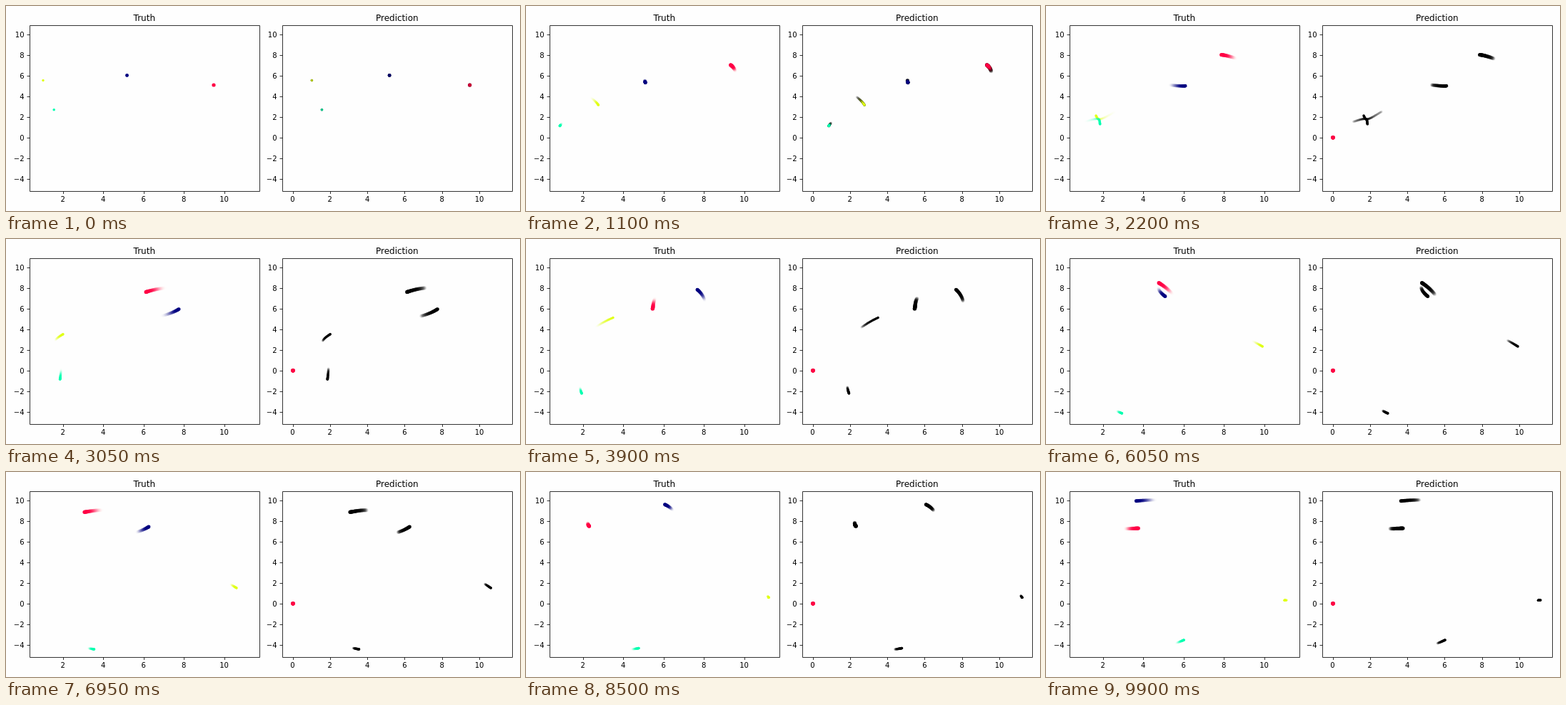
These frames come from a looping animation (720x288 px, 9.95 s). An HTML page with a canvas:

```html
<!DOCTYPE html>
<html lang="en">
<head>
<meta charset="utf-8">
<title>Truth and prediction</title>
<style>
  html, body { margin: 0; width: 720px; height: 288px; overflow: hidden; background: #fefefe; }
  svg, canvas { position: absolute; left: 0; top: 0; display: block; }
  text { font: 10px "DejaVu Sans", sans-serif; fill: #000; }
  .title { font-size: 12px; }
  path { fill: none; stroke: #000; stroke-width: 0.8; }
</style>
</head>
<body>
<canvas id="dots" width="720" height="288"></canvas>
<svg id="axes" width="720" height="288"></svg>
<script>
const STEP = 50, STEPS = 199;
const TRAIL = 10, DENSITY = 3; // trail length in steps, dots per step
const COLLAPSE = 25; // step from which every prediction sits at the origin
const ORIGIN = [402, 184.8];

// Turning points of each path: [step, x, y] in pixels of the left plot.
const yellow = { color: '#e0ff17', r: 1.7, keys: [
  [0, 52, 104.5], [31, 101, 146.5], [35, 97, 148.5], [41, 74, 159], [44, 70, 154], [69, 97, 124],
  [78, 122, 110.5], [87, 178, 89], [93, 226, 111.5], [102, 260.5, 128.5], [139, 323, 163],
  [170, 340, 176.5], [198, 334, 180.2]] };

const green = { color: '#00ffb0', r: 1.8, keys: [
  [0, 67.2, 145.8], [22, 47.5, 168.5], [35, 54.5, 162.5], [41, 74, 159.3], [44, 75.7, 166],
  [69, 75.5, 208], [78, 78, 217], [102, 91.5, 236], [139, 123.5, 249], [170, 158, 247.5],
  [198, 193.2, 236]] };

const navy = { color: '#000080', r: 2.45, keys: [
  [0, 169.5, 97.5], [20, 167, 107], [35, 173, 111], [44, 195, 112.3], [69, 250.4, 87],
  [78, 240, 71.2], [93, 197, 56.8], [102, 166, 58.2], [130, 182.5, 84.7], [139, 200, 77],
  [152, 210, 63.5], [170, 194.5, 45.7], [198, 126.3, 40.8]] };

const red = { color: '#ff0045', r: 2.6, keys: [
  [0, 291, 111], [12, 293.5, 93], [35, 266.5, 73.7], [44, 245.7, 68.5], [69, 181, 83.5],
  [78, 177.3, 98], [93, 172.8, 103.5], [102, 183.8, 93.7], [130, 134.8, 53.7], [139, 110, 56.3],
  [170, 88.5, 76], [198, 129.3, 79]] };

const bodies = [yellow, green, navy, red];

// Slope of a parabola through three neighbouring keys.
function slope(keys, i, axis) {
  const last = keys.length - 1, c = Math.min(Math.max(i, 1), last - 1);
  const [a, b, d] = [keys[c - 1], keys[c], keys[c + 1]];
  const h0 = b[0] - a[0], h1 = d[0] - b[0];
  const v0 = (b[axis] - a[axis]) / h0, v1 = (d[axis] - b[axis]) / h1;
  const mid = (h1 * v0 + h0 * v1) / (h0 + h1);
  return i === 0 ? 2 * v0 - mid : i === last ? 2 * v1 - mid : mid;
}

// Hermite curve through the keys.
function place(keys, s) {
  let i = 0;
  while (i < keys.length - 2 && s >= keys[i + 1][0]) i++;
  const a = keys[i], b = keys[i + 1], h = b[0] - a[0], u = (s - a[0]) / h;
  const ease = u * u * (3 - 2 * u);
  return [1, 2].map(k =>
    a[k] + (b[k] - a[k]) * ease +
    h * u * (1 - u) * ((1 - u) * slope(keys, i, k) - u * slope(keys, i + 1, k)));
}

const toRight = ([x, y]) => [402 + (x - 23.5) * 0.9257, y];

const ctx = document.getElementById('dots').getContext('2d');

function dot([x, y], r, color, alpha) {
  ctx.globalAlpha = alpha;
  ctx.fillStyle = color;
  ctx.beginPath();
  ctx.arc(x, y, r, 0, Math.PI * 2);
  ctx.fill();
}

// Visits the dots from the tail to the head; fresh grows to 1 at the head.
function eachTrailDot(step, draw) {
  for (let k = (TRAIL - 1) * DENSITY; k >= 0; k--) {
    const s = step - k / DENSITY;
    if (s >= 0) draw(s, 1 - k / DENSITY / TRAIL);
  }
}

const fade = fresh => fresh ** 2.5;

function render(step) {
  ctx.clearRect(0, 0, 720, 288);
  for (const { keys, color, r } of bodies) {
    eachTrailDot(step, (s, fresh) => {
      const p = place(keys, s);
      dot(p, r, color, fade(fresh));
      dot(toRight(p), r, '#000', fresh);
    });
  }
  for (const { keys, color, r } of bodies) {
    eachTrailDot(step, (s, fresh) => {
      const p = s < COLLAPSE ? toRight(place(keys, s)) : ORIGIN;
      dot(p, r, color, fade(fresh) * 0.8);
    });
  }
}

function label(x, y, str, anchor, cls = '') {
  return `<text x="${x}" y="${y}" text-anchor="${anchor}" class="${cls}">${str}</text>`;
}

function plot(left, title, zero, unit, first) {
  let d = `M${left} 27.5h322v233h-322z`;
  let out = label(left + 160.3, 21, title, 'middle', 'title');
  for (let v = first; v <= 10; v += 2) {
    const x = zero + v * unit;
    d += `M${Math.floor(x) + 0.5} 260.5v3.5`;
    out += label(x - 0.5, 275, v, 'middle');
  }
  for (let v = -4; v <= 10; v += 2) {
    const y = Math.round(185 - v * 14.46);
    d += `M${left} ${y + 0.5}h-4`;
    out += label(left - 8, y + 4, String(v).replace('-', '\u2212'), 'end');
  }
  return `<path d="${d}"/>${out}`;
}

document.getElementById('axes').innerHTML =
  plot(33.5, 'Truth', 23.6, 28.25, 2) + plot(387.5, 'Prediction', 402, 26.15, 0);

const start = performance.now();
function tick() {
  const t = Math.max(0, performance.now() - start);
  render(Math.floor(t / STEP) % STEPS);
  requestAnimationFrame(tick);
}
tick();
</script>
</body>
</html>
```
